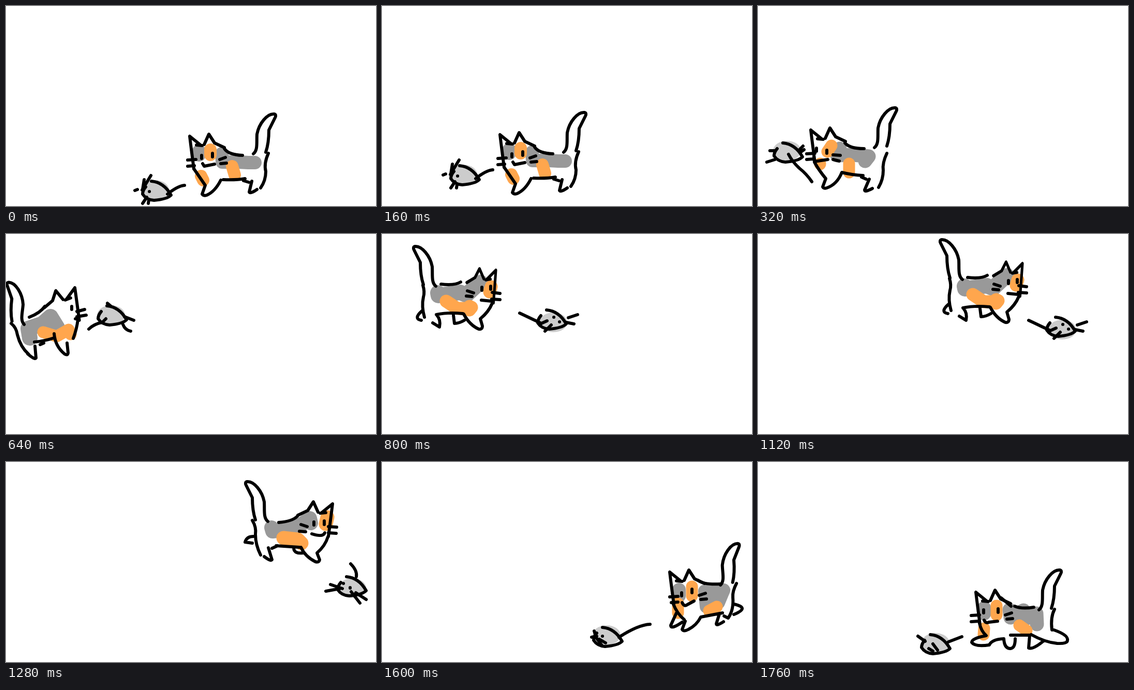
Recreate the animation shown at these times as an HTML page with a canvas. Size 715 by 387 pixels, loop 1920 ms.

```html
<!DOCTYPE html>
<html lang="en">
<head>
<meta charset="utf-8">
<title>Cat chasing a mouse</title>
<style>
html, body { margin: 0; width: 100%; height: 100%; overflow: hidden; background: #fff; }
canvas { display: block; }
</style>
</head>
<body>
<canvas width="715" height="387"></canvas>
<script>
const ctx = document.querySelector('canvas').getContext('2d');
const STEP = 160;

// Parts shared by every pose, drawn facing left around a local origin.
const EARS = 'M21 17L0 0Q3 25 8 63M13 17L24 18M28 16L37 -4L48 13L67 22';
const TAIL = 'M0 0C9 -7 6 -22 7 -38C11 -59 27 -78 40 -77Q45 -76 42 -70L30 -46Q30 -21 24 -3';
const SHELL = 'M0 0Q24 2 38 27Q30 35 5 37Q-10 36 -17 25Q-17 18 -11 11';

// ears and tail: [x, y, scaleX, degrees]; patches: [width, path]
const cats = {
  stalk: {
    ears: [355, 252, 1, 0], tail: [478, 286, 1, 0],
    gray: [26, 'M373 281V288M417 286L418 302H450L468 303H481'],
    orange: [24, 'M395 278V288M437 310L442 327M377 329L381 337'],
    ink: 'M378 289V295M399 285V292M351 298L367 297M351 310L364 309M413 297L424 293M415 305L426 304' +
      'M380 305L383 310L403 306M422 276Q430 288 457 289M363 315Q370 325 385 347L379 364Q382 368 388 366Q404 359 415 337' +
      'M420 336Q445 337 462 334M459 338L469 341M475 339L470 360Q472 364 485 355M507 285Q498 305 502 320Q502 338 492 352'
  },
  trot: {
    ears: [102, 240, 1, 0], tail: [225, 274, 1, 0],
    gray: [27, 'M158 276L153 289L185 288L214 291L207 300'],
    orange: [23, 'M142 270L134 282M176 305V322M120 305V306'],
    ink: 'M113 275V281M133 279V285M94 286L110 285M94 297L106 296M145 288L159 289M145 297L157 300' +
      'M108 292L109 301L135 297M168 265Q177 276 205 276M109 302Q117 317 131 334L125 350Q127 354 133 352Q153 345 162 322' +
      'Q182 327 203 328M200 331L209 335M215 335L206 356Q206 361 221 353M249 285Q240 304 242 318Q242 336 233 351'
  },
  climb: {
    ears: [133, 104, -1, -15], tail: [35, 175, -1, 7.5],
    gray: [30, 'M46 201L43 183L70 174L86 160L99 181'],
    orange: [23, 'M72 190L98 198L121 185L125 194'],
    ink: 'M127 140V146M137 150L152 146M137 160L155 157M134 164L140 165M45 161Q66 153 75 140' +
      'M139 165Q137 183 130 202M55 209Q75 207 93 201M66 214L73 211M93 193Q95 217 113 232Q119 236 120 230L118 211' +
      'M56 217L58 240Q56 244 42 232M10 173Q20 181 22 195Q28 219 44 233'
  },
  stride: {
    ears: [387, 66, -.85, -2], tail: [271, 97, -1, 0],
    gray: [30, 'M275 110L276 115L318 109L330 114L347 98L357 90'],
    orange: [25, 'M378 98L375 108M291 126L312 140H335M336 136L340 138L336 143'],
    ink: 'M360 99V105M377 97V103M332 106L344 110M330 116L341 117M380 109L395 111M379 122L395 123' +
      'M359 124L379 126M281 93Q307 96 319 89M380 130Q373 147 357 160L361 174Q361 181 354 180Q336 172 325 151' +
      'M272 152Q295 147 323 150M273 153Q281 162 278 176L265 168M305 153L307 169Q316 169 326 163' +
      'M246 95Q250 108 247 118Q243 136 249 157M244 145Q227 160 243 163'
  },
  leap: {
    ears: [631, 81, -1, 0], tail: [506, 115, -1, 0],
    gray: [28, 'M513 127L515 134L548 130L572 120L587 109L589 118'],
    orange: [27, 'M621 107L618 120M536 147L564 150L571 157'],
    ink: 'M595 116V122M615 114V121M570 121L582 125M567 134L579 135M623 125L639 126M623 137L638 138' +
      'M591 139Q613 146 616 137M527 117Q553 115 563 105M622 145Q617 162 601 176L606 189Q605 195 598 193Q578 183 570 165' +
      'M522 162L567 165M514 167L525 162M507 166L514 189Q512 193 499 183M556 167Q557 178 574 176' +
      'M476 113Q484 126 482 140Q482 160 492 180M478 144Q465 144 462 155L476 157'
  },
  pivot: {
    ears: [556, 213, 1, 0], tail: [654, 238, 1, -5],
    gray: [26, 'M574 247V259M660 248L624 250L627 280L643 264L660 248L650 272'],
    orange: [23, 'M599 241V259M572 274V292M632 288L647 280'],
    ink: 'M579 253V259M599 246V253M556 261L572 260M559 272L572 271M613 258L625 254M616 266L627 265' +
      'M580 272Q584 281 590 276L603 269M611 229Q622 238 655 236M563 275Q570 293 584 305' +
      'M569 292L558 316Q558 325 580 310M586 308L580 324Q583 329 592 324Q608 316 616 300L658 292' +
      'M652 294L646 313Q646 318 660 309M685 235Q677 250 678 262Q680 286 669 302L661 298M680 275Q712 282 680 295'
  },
  sprint: {
    ears: [421, 252, 1, 0], tail: [543, 286, 1, 0],
    gray: [27, 'M437 283V293M486 286L488 301L513 287L520 302L538 293L539 314'],
    orange: [23, 'M461 278V296M437 322L436 334M505 316L519 326'],
    ink: 'M436 286V292M464 284V291M412 297L428 296M412 309L426 308M478 296L490 292M481 304L492 303' +
      'M437 306Q440 313 446 310L463 308M470 263L489 279M496 279Q510 285 533 281M428 312Q431 327 441 336' +
      'Q413 341 413 349Q419 358 447 354Q452 343 475 342Q476 361 488 361Q497 360 497 342M488 335H525' +
      'L523 360Q532 363 552 346M528 334Q555 349 578 351Q598 352 598 345Q600 335 572 325M573 285Q565 300 568 325'
  }
};

// at: outline start; fill: centre of the body colour
const mice = {
  stalk: { at: [281, 339], fill: [288, 356],
    ink: 'M263 356L280 328M267 336L264 355M312 364Q332 348 345 347M249 357L254 355M264 382L272 370M275 382L276 375M277 359h.1' },
  trot: { at: [48, 265], fill: [56, 280],
    ink: 'M59 287Q66 301 80 314Q94 325 104 340M17 302L33 297M23 280L33 280M78 280L87 271M82 283L89 278' },
  climb: { at: [195, 139], fill: [203, 157],
    ink: 'M160 184Q170 174 186 171L193 164M229 160L247 167M226 175Q230 186 241 188M196 134L203 140' },
  stride: { at: [469, 133], fill: [482, 157],
    ink: 'M417 139L459 159L470 154M466 174L478 162M511 148L529 142M507 157L522 160M483 147h.1M494 156h.1' },
  leap: { at: [658, 222], fill: [669, 244],
    ink: 'M677 222Q679 210 666 197M627 237L650 245M618 250L645 245M667 251L684 273M676 253L696 266M652 235h.1M665 243v1' },
  pivot: { at: [426, 320], fill: [434, 335],
    ink: 'M458 339Q495 315 518 314M410 327L412 333M405 339L415 337M414 340L425 355M420 343L432 350M426 337h.1' },
  sprint: { at: [333, 334], fill: [343, 350],
    ink: 'M368 348L394 338M309 337L323 347M330 361L338 366M338 352L347 364' }
};

// [cat, dx, dy, mouse, dx, dy], one entry per step
const steps = [
  ['stalk', 0, 0, 'stalk', 0, 0],
  ['stalk', -127, -3, 'stalk', -131, -30],
  ['trot', 0, 0, 'trot', 0, 0],
  ['trot', -22, -47, 'trot', -12, -113],
  ['climb', 0, 0, 'climb', 0, 0],
  ['stride', -167, 4, 'stride', -151, 14],
  ['stride', 0, 0, 'stride', 0, 0],
  ['stride', 124, -9, 'stride', 106, 28],
  ['leap', 0, 0, 'leap', 0, 0],
  ['leap', 40, 40, 'pivot', 130, -15],
  ['pivot', 0, 0, 'pivot', 0, 0],
  ['sprint', 0, 0, 'sprint', 0, 0]
];

function stroke(path, color = '#000', width = 6) {
  ctx.strokeStyle = color;
  ctx.lineWidth = width;
  ctx.stroke(new Path2D(path));
}

function part(path, [x, y, scaleX = 1, degrees = 0]) {
  ctx.save();
  ctx.translate(x, y);
  ctx.rotate(degrees * Math.PI / 180);
  ctx.scale(scaleX, 1);
  stroke(path);
  ctx.restore();
}

function drawCat({ ears, tail, gray, orange, ink }) {
  stroke(gray[1], '#999', gray[0]);
  stroke(orange[1], '#ffa64d', orange[0]);
  part(EARS, ears);
  part(TAIL, tail);
  stroke(ink);
}

function drawMouse({ at, fill, ink }) {
  ctx.fillStyle = '#ccc';
  ctx.beginPath();
  ctx.ellipse(...fill, 27, 19, 0, 0, 2 * Math.PI);
  ctx.fill();
  part(SHELL, at);
  stroke(ink);
}

function shifted(dx, dy, draw, pose) {
  ctx.save();
  ctx.translate(dx, dy);
  draw(pose);
  ctx.restore();
}

ctx.lineCap = ctx.lineJoin = 'round';

function frame() {
  const [cat, cx, cy, mouse, mx, my] = steps[Math.floor(performance.now() / STEP) % steps.length];
  ctx.clearRect(0, 0, 715, 387);
  shifted(mx, my, drawMouse, mice[mouse]);
  shifted(cx, cy, drawCat, cats[cat]);
  requestAnimationFrame(frame);
}
frame();
</script>
</body>
</html>
```
